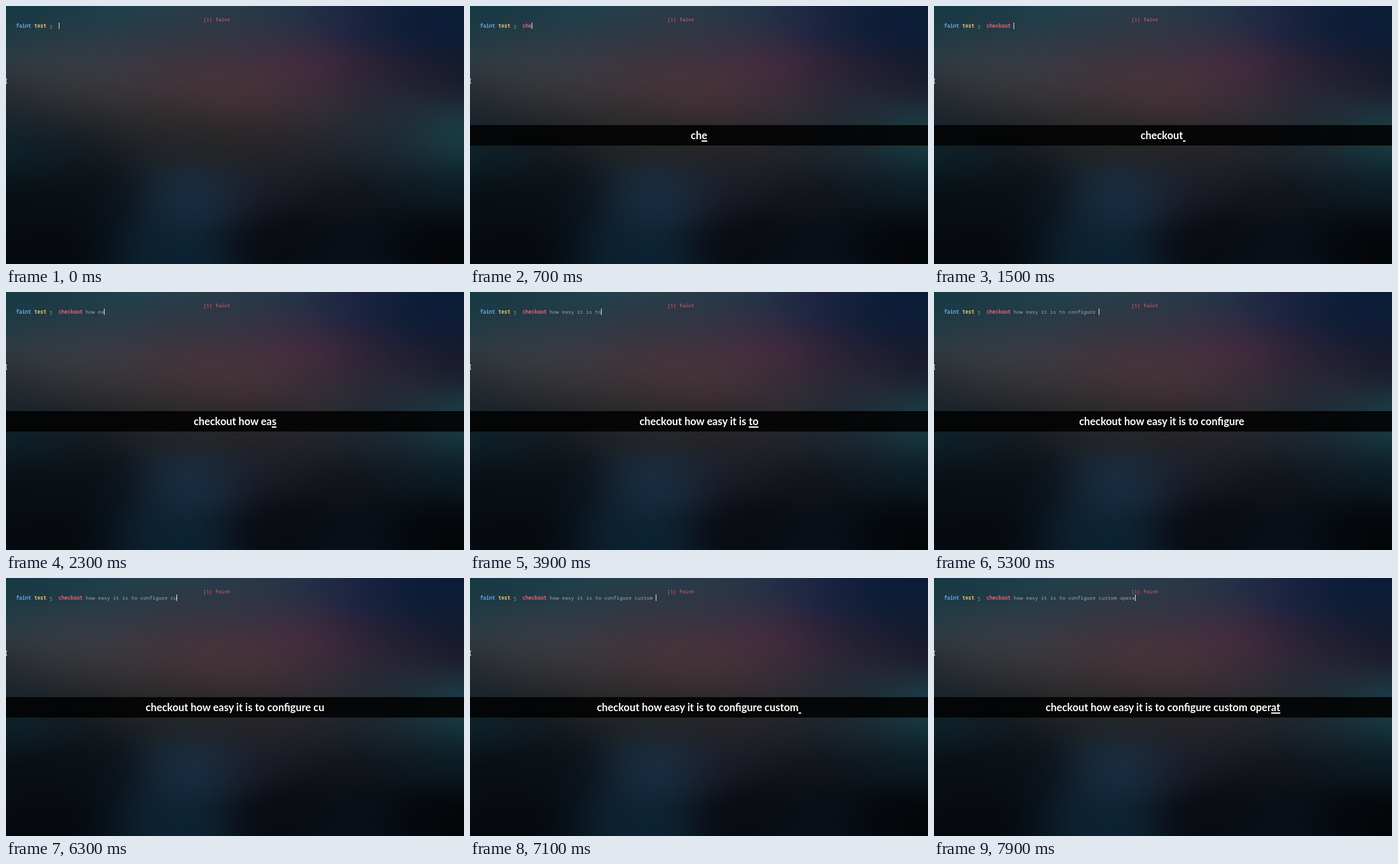
Write an HTML page with a canvas that moves like this. It is 720x405 px and loops after 8 s.

```html
<!DOCTYPE html>
<html lang="en">
<head>
<meta charset="utf-8">
<title>Terminal typing</title>
<style>
  html, body { margin: 0; width: 100%; height: 100%; overflow: hidden; background: #0b1016; }
  #stage { position: relative; width: 720px; height: 405px; overflow: hidden; }
  #stage > * { position: absolute; }
  #backdrop { inset: 0; width: 720px; height: 405px; }
  .mono { font: 7.95px/10px "Noto Sans Mono", monospace; white-space: pre; }
  #title { left: 310px; top: 15.5px; color: #d9656f; }
  #prompt { left: 15.8px; top: 26px; color: #a0a7b1; }
  b { font-weight: 700; }
  .dir { color: #5caae8; }
  .branch { color: #dcbc70; }
  .sign { color: #7da565; }
  #command { color: #e0666e; }
  #caret { display: inline-block; width: 1px; height: 10px; margin-right: -1px; vertical-align: top; background: #dfe3e8; }
  #pointer { left: -1px; top: 114px; width: 1px; height: 6px; border: solid #b9bec2; border-width: 1px 1px 1px 0; border-right: 0; border-left: 1px solid #b9bec2; margin-left: 1px; }
  #keys {
    left: 0; top: 187px; width: 720px; height: 32px; background: rgba(0, 0, 0, .85);
    color: #fff; text-align: center; white-space: pre;
    font: 700 16.3px/31px Lato, sans-serif;
  }
  #fresh { text-decoration: underline 1.7px; text-underline-offset: 2px; text-decoration-skip-ink: none; }
</style>
</head>
<body>
<div id="stage">
  <canvas id="backdrop" width="180" height="101"></canvas>
  <div id="title" class="mono">[1] faint</div>
  <div id="prompt" class="mono"><b class="dir">faint</b> <b class="branch">test</b> <span class="sign">ʒ</span>  <b id="command"></b><span id="args"></span><i id="caret"></i></div>
  <div id="pointer"></div>
  <div id="keys"><span id="settled"></span><span id="fresh"></span></div>
</div>
<script>
const LOOP = 8000;
const LINE = "checkout how easy it is to configure custom operat";
const COMMAND_LENGTH = 8;
const $ = id => document.getElementById(id);

// Colour points [x, y, colour], blended into a soft backdrop.
const GLOW = [
  [0, 5, "#0f3d46"], [90, 5, "#163a48"], [190, 5, "#1c4552"], [320, 8, "#25404c"],
  [430, 5, "#22384a"], [540, 25, "#1e2443"], [640, 30, "#0a1d38"], [715, 40, "#0a1b36"],
  [10, 50, "#233641"], [130, 48, "#2c3745"], [260, 52, "#33343f"], [380, 55, "#3a3040"],
  [60, 92, "#3d4246"], [165, 100, "#403d45"], [290, 110, "#4b353d"], [370, 138, "#4a3538"],
  [470, 95, "#4a2b3f"], [590, 105, "#2b2133"], [705, 105, "#1a1a2a"],
  [10, 150, "#22262d"], [115, 150, "#323132"], [235, 160, "#373233"],
  [480, 160, "#352f36"], [600, 168, "#242d36"], [705, 205, "#194049"],
  [15, 220, "#0b222b"], [115, 210, "#12181e"], [240, 205, "#1e2225"], [345, 205, "#272526"],
  [450, 220, "#24242a"], [580, 225, "#1c252e"],
  [20, 310, "#090e13"], [140, 295, "#0b1016"], [300, 295, "#193046"], [415, 285, "#1d1b25"],
  [550, 300, "#101319"], [690, 285, "#0c1c24"],
  [90, 385, "#06090d"], [250, 385, "#0c2333"], [440, 355, "#08090e"], [550, 385, "#08111b"], [680, 370, "#030508"]
].map(([x, y, hex]) => ({ x, y, rgb: [1, 3, 5].map(i => parseInt(hex.slice(i, i + 2), 16)) }));

function paintBackdrop() {
  const { width, height } = $("backdrop");
  const ctx = $("backdrop").getContext("2d");
  const image = ctx.createImageData(width, height);
  for (let row = 0; row < height; row++) {
    for (let col = 0; col < width; col++) {
      const sum = [0, 0, 0];
      let total = 0;
      for (const { x, y, rgb } of GLOW) {
        const dx = (col * 4 + 2 - x) / 62;
        const dy = (row * 4 + 2 - y) / 36;
        const weight = Math.exp(-(dx * dx + dy * dy) / 2);
        total += weight;
        rgb.forEach((value, i) => sum[i] += value * weight);
      }
      image.data.set([...sum.map(value => value / total), 255], (row * width + col) * 4);
    }
  }
  ctx.putImageData(image, 0, 0);
}

// [time, keys shown, keys underlined, keys the prompt is still behind by]
const STEPS = [
  [0, 0, 0, 0], [500, 2, 2, 0], [700, 3, 1, 0], [900, 4, 1, 0], [1100, 6, 2, 0], [1300, 8, 2, 0],
  [1500, 9, 1, 0], [1700, 11, 2, 0], [1900, 13, 2, 0], [2100, 15, 2, 0], [2300, 16, 1, 1],
  [2500, 18, 2, 0], [2700, 19, 1, 1], [2900, 20, 1, 0], [3100, 22, 2, 0], [3300, 24, 2, 0],
  [3500, 24, 0, 0], [3900, 26, 2, 0], [4100, 27, 1, 0], [4300, 29, 2, 0], [4500, 32, 3, 0],
  [4700, 33, 1, 0], [4900, 35, 2, 0], [5100, 37, 2, 0], [5300, 37, 0, 0], [5900, 38, 1, 0],
  [6100, 39, 1, 0], [6300, 39, 0, 0], [6500, 41, 2, 0], [6700, 42, 1, 0], [6900, 43, 1, 0],
  [7100, 44, 1, 0], [7300, 46, 2, 0], [7500, 47, 1, 0], [7700, 48, 1, 0], [7900, 50, 2, 1]
];

function show([, shown, fresh, lag]) {
  const typed = LINE.slice(0, shown - lag);
  $("command").textContent = typed.slice(0, COMMAND_LENGTH);
  $("args").textContent = typed.slice(COMMAND_LENGTH);
  $("settled").textContent = LINE.slice(0, shown - fresh);
  $("fresh").textContent = LINE.slice(shown - fresh, shown);
  $("keys").hidden = !shown;
}

// Sizes the caption face so that its first 26 letters span 188px.
function sizeCaption() {
  const ctx = document.createElement("canvas").getContext("2d");
  ctx.font = "700 100px Lato, sans-serif";
  $("keys").style.fontSize = 18800 / ctx.measureText(LINE.slice(0, 26)).width + "px";
}

let start, current;
function tick(now) {
  start ??= now;
  const time = (now - start) % LOOP;
  const step = STEPS.findLast(([from]) => from <= time);
  if (step !== current) show(current = step);
  requestAnimationFrame(tick);
}

paintBackdrop();
sizeCaption();
show(STEPS[0]);
requestAnimationFrame(tick);
</script>
</body>
</html>
```
